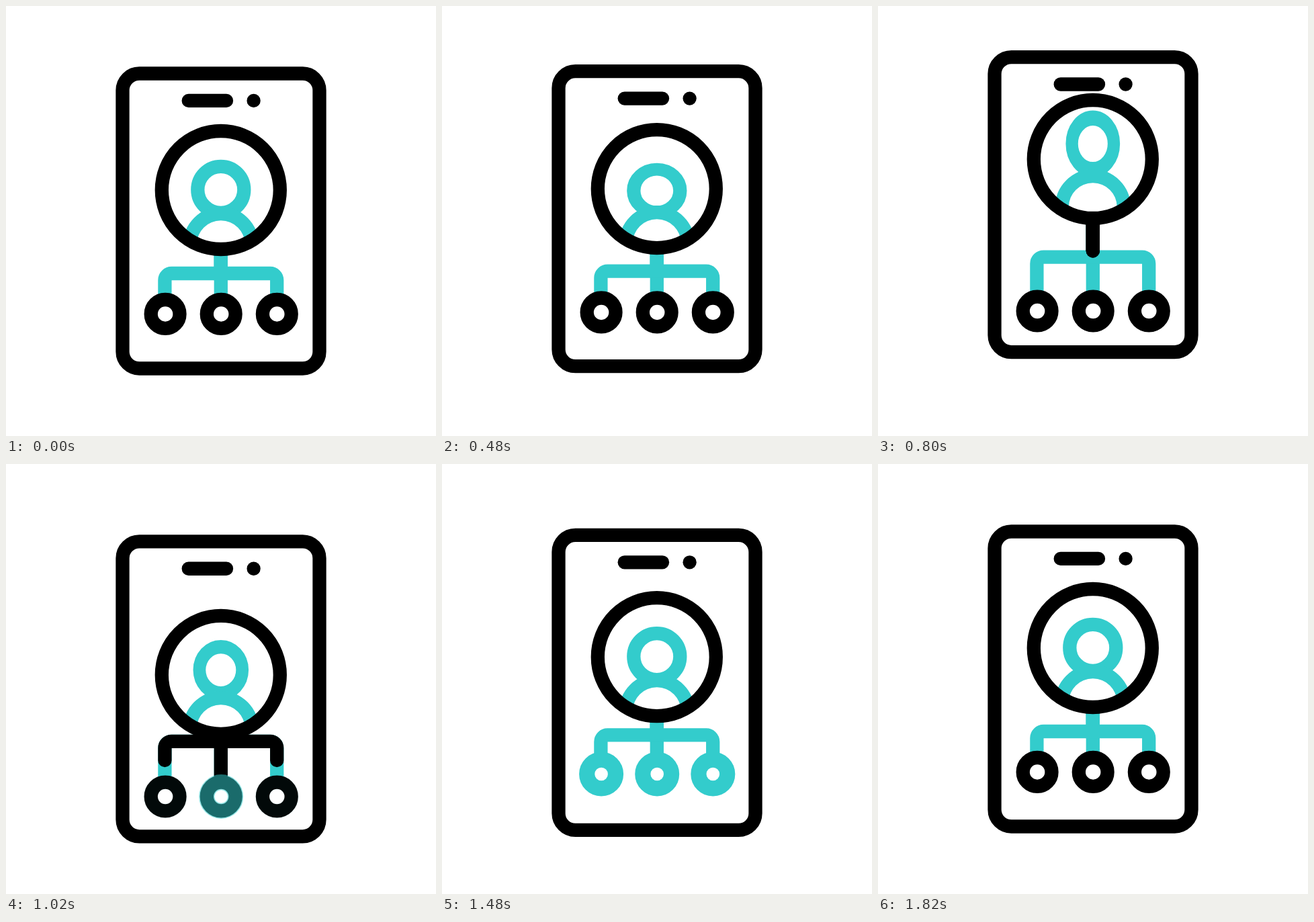
An HTML page with a canvas that plays this animation: 640x640 px, repeating every 2.28 s.

```html
<!DOCTYPE html>
<html>
<head>
<meta charset="utf-8">
<style>
html, body { margin: 0; width: 100%; height: 100%; overflow: hidden; background: #fff; }
canvas { display: block; width: 100vmin; height: 100vmin; }
</style>
</head>
<body>
<canvas id="stage" width="640" height="640"></canvas>
<script>
const ctx = document.getElementById('stage').getContext('2d');
const LOOP = 2280, STEP = 20;
const BLACK = '#000', TEAL = '#33cccc', WHITE = '#fff';
const MID = 319.8, LINE = 20.3, SPREAD = 83.4;
const STEM = 58, DROP = 52;

// Turning points of the jump and of the head's inertia.
const JUMP = [160, 330, 780, 990, 1220, 1540, 1820];
const HEAD = [180, 460, 780, 1230, 1440];

const ramp = (t, from, to) => Math.max(0, Math.min(1, (t - from) / (to - from)));
const ease = x => (1 - Math.cos(Math.PI * x)) / 2;

// Swings from rest through one peak per inner beat and back to rest.
// The rise to the second peak is a launch: fast first, then slowing.
function swing(t, beats, peaks, launch = 1) {
  const values = [0, ...peaks, 0];
  return values.slice(1).reduce((sum, value, i) => {
    const x = ramp(t, beats[i], beats[i + 1]);
    return sum + (value - values[i]) * ease(i === 1 ? x ** launch : x);
  }, 0);
}

const jump = (t, ...peaks) => swing(t, JUMP, peaks, .67);
const sway = (t, ...peaks) => swing(t, HEAD, peaks);

function stroke(color, width = LINE) {
  ctx.strokeStyle = color;
  ctx.lineWidth = width;
  ctx.stroke();
}

function fill(color) {
  ctx.fillStyle = color;
  ctx.fill();
}

function circle(x, y, r) {
  ctx.beginPath();
  ctx.arc(x, y, r, 0, Math.PI * 2);
}

function drawPhone(dy) {
  const speakerY = 140.9 + dy;
  ctx.lineCap = 'round';
  ctx.beginPath();
  ctx.roundRect(173.5, 100.5 + dy, 293, 439, 25);
  stroke(BLACK);
  ctx.beginPath();
  ctx.moveTo(271.7, speakerY);
  ctx.lineTo(328, speakerY);
  stroke(BLACK);
  circle(368.6, speakerY, LINE / 2);
  fill(BLACK);
}

// side is -1, 0 or 1; a branch runs from the ring to one node.
function branchPath(side, top, bar, bottom) {
  const x = MID + side * SPREAD;
  ctx.beginPath();
  ctx.moveTo(MID, top);
  ctx.lineTo(MID, bar);
  if (side) ctx.arcTo(x, bar, x, bottom, 10);
  ctx.lineTo(x, bottom);
}

function drawBranches(t, bar, ringY, nodeY) {
  const sides = [-1, 0, 1];
  ctx.lineCap = 'butt';
  for (const side of sides) {
    branchPath(side, ringY + 88, bar, nodeY);
    stroke(TEAL);
  }

  // A black pulse runs down each branch.
  ctx.lineCap = 'round';
  for (const side of sides) {
    const length = STEM + DROP + (side ? SPREAD - 4.3 : 0);
    const head = Math.min(length, (t - 708) * .53);
    const tail = Math.max(0, (t - 1106) * (side ? .5 : .383));
    if (head <= 0 || tail >= length) continue;
    branchPath(side, bar - STEM, bar, bar + DROP);
    ctx.setLineDash([head - tail, LOOP]);
    ctx.lineDashOffset = -tail;
    stroke(BLACK);
  }
  ctx.setLineDash([]);
}

function drawNodes(t, y) {
  for (const side of [-1, 0, 1]) {
    const lit = 920 + Math.abs(side) * 92;
    circle(320.2 + side * 83.1, y, 21.4);
    fill(WHITE);
    stroke(BLACK);
    ctx.globalAlpha = ramp(t, lit, lit + 190) * (1 - ramp(t, 1560, 1740));
    stroke(TEAL, 23.2);
    ctx.globalAlpha = 1;
  }
}

function drawPerson(t, ringY) {
  const headY = sway(t, 3.7, -22.5, 6);
  const rise = Math.max(0, -headY / 22.5) ** 2;
  const shoulders = ringY + 81 - 10 * rise;

  circle(MID, ringY, 88);
  fill(WHITE);
  ctx.save();
  ctx.clip();

  ctx.save();
  ctx.translate(MID, ringY - .6 + headY);
  ctx.scale(1 + sway(t - 80, 0, -.105, 0), 1 + sway(t, -.08, .11, -.09));
  circle(0, 0, 34.5);
  stroke(TEAL);
  ctx.restore();

  ctx.beginPath();
  ctx.moveTo(MID - 46, shoulders + 30);
  ctx.arc(MID, shoulders, 46, Math.PI, 0);
  ctx.lineTo(MID + 46, shoulders + 30);
  stroke(TEAL);
  ctx.restore();

  circle(MID, ringY, 88);
  stroke(BLACK);
}

function render(t) {
  const phone = jump(t, 16, -25.3, 16, -12, 7);
  const ringY = 274 + jump(t, 38.5, -48, 43, -30.5, 17.2);
  const nodeY = 458.4 + jump(t, 0, -5.4, 39, -19.4, 5.2);
  ctx.fillStyle = WHITE;
  ctx.fillRect(0, 0, 640, 640);
  drawPhone(phone);
  drawBranches(t, 398 + phone, ringY, nodeY);
  drawNodes(t, nodeY);
  drawPerson(t, ringY);
}

const begin = performance.now();
function tick() {
  const t = (performance.now() - begin) % LOOP;
  render(Math.floor(t / STEP) * STEP);
  requestAnimationFrame(tick);
}
tick();
</script>
</body>
</html>
```
